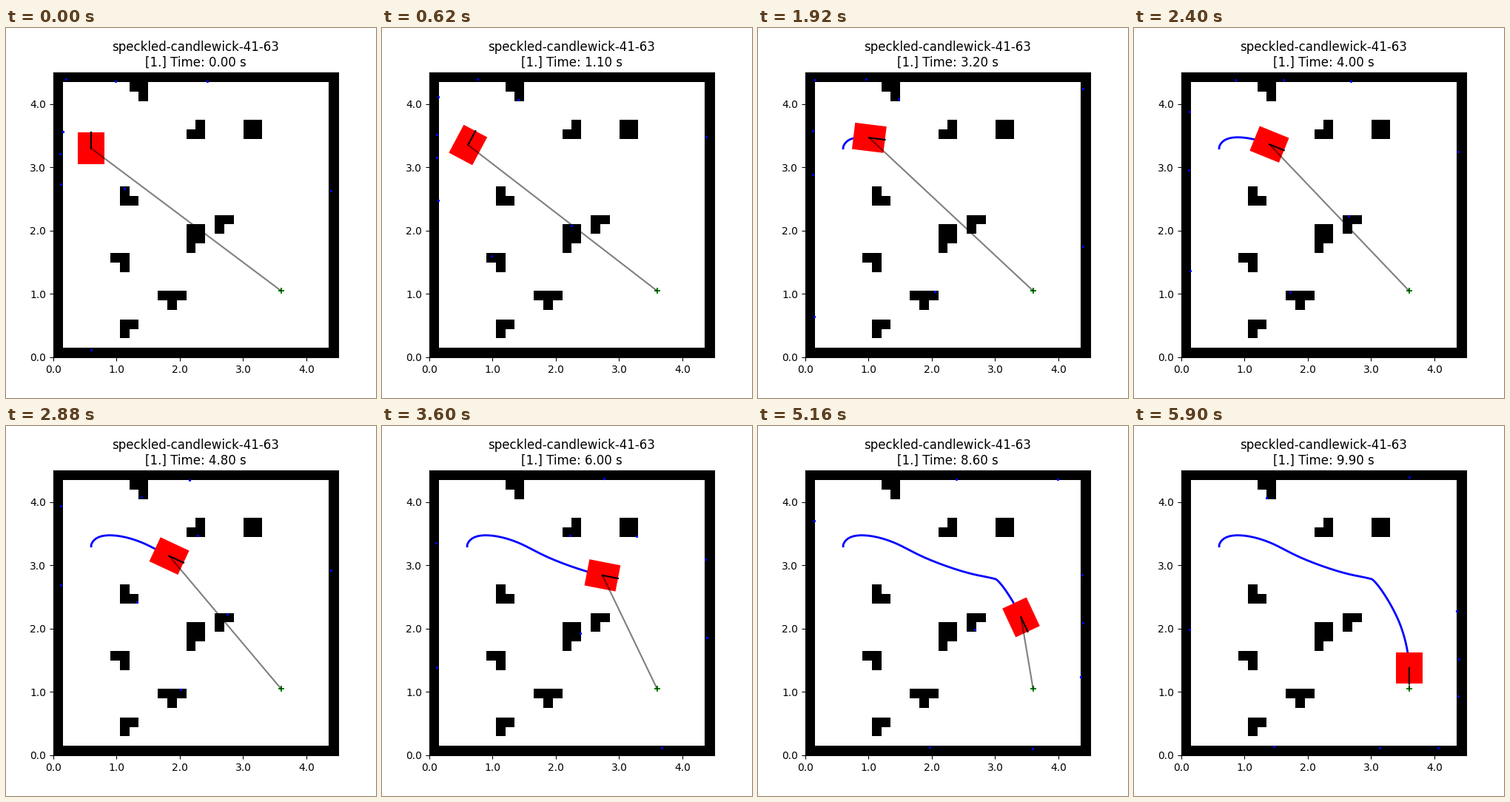
Recreate the animation shown at these times as a matplotlib script. Size 500 by 500 pixels, loop 5.92 s.

```python
import numpy as np
import matplotlib.pyplot as plt
from matplotlib.animation import FuncAnimation
from matplotlib.patches import Polygon

NAME = "speckled-candlewick-41-63"
CELL, N = 0.15, 30
SIZE = CELL * N
GOAL = np.array([3.6, 1.05])
STEPS = 100
LENGTH, WIDTH = 0.5, 0.42

# Obstacles: (left column, top row) -> rows from top to bottom
BLOCKS = {
    (8, 28): "## .#", (14, 24): ".# ##", (20, 24): "## ##",
    (7, 17): "#. ##", (14, 13): "## ## #.", (17, 14): "## #.",
    (6, 10): "## .#", (11, 6): "### .#.", (7, 3): "## #.",
}

# Key poses: step, x, y, heading in degrees, speed in metres per step
KEYS = np.array([
    (0, 0.6, 3.3, 90, 0.003),
    (11, 0.614, 3.354, 62, 0.01),
    (32, 1.012, 3.467, -7, 0.04),
    (42, 1.5, 3.316, -26, 0.06),
    (48, 1.833, 3.148, -25, 0.066),
    (60, 2.737, 2.842, -11, 0.066),
    (69, 3.012, 2.781, -25, 0.005),
    (74, 3.07, 2.729, -48, 0.025),
    (86, 3.41, 2.18, -65, 0.075),
    (99, 3.6, 1.38, -90, 0.04),
])


def unit(a):
    return np.stack([np.cos(a), np.sin(a)], axis=-1)


def make_grid():
    grid = np.zeros((N, N), bool)
    grid[[0, -1], :] = grid[:, [0, -1]] = True
    for (col, row), shape in BLOCKS.items():
        for j, line in enumerate(shape.split()):
            for i, ch in enumerate(line):
                grid[row - j, col + i] |= ch == "#"
    return grid


def make_poses():
    """Cubic Hermite drive through the key poses, facing along its velocity."""
    steps, xy = KEYS[:, 0], KEYS[:, 1:3]
    vel = KEYS[:, 4:] * unit(np.radians(KEYS[:, 3]))
    t = np.arange(STEPS)
    k = np.searchsorted(steps, t, side="right").clip(1, len(steps) - 1)
    span = (steps[k] - steps[k - 1])[:, None]
    u = (t - steps[k - 1])[:, None] / span
    p, d = xy[k - 1], xy[k] - xy[k - 1]
    a, b = vel[k - 1] * span, vel[k] * span
    pos = p + a * u + (3 * d - 2 * a - b) * u**2 + (a + b - 2 * d) * u**3
    v = a + 2 * (3 * d - 2 * a - b) * u + 3 * (a + b - 2 * d) * u**2
    return pos, np.arctan2(v[:, 1], v[:, 0])


def scan(pos, theta, rng):
    """End points of nine beams, each sunk a little into what it hits."""
    rays = unit(theta + np.pi + np.radians(40) * np.arange(9))
    reach = np.arange(0, 6.5, 0.005)
    cells = ((pos + reach[:, None, None] * rays) / CELL).astype(int)
    cells = cells.clip(0, N - 1)
    hit = reach[grid[cells[..., 1], cells[..., 0]].argmax(axis=0)]
    return pos + (hit + rng.uniform(0, 0.045, 9))[:, None] * rays


grid = make_grid()
path, heading = make_poses()
rng = np.random.default_rng(7)
scans = [scan(p, a, rng) for p, a in zip(path, heading)]
CORNERS = np.array([(-1, -1), (1, -1), (1, 1), (-1, 1)]) / 2

fig, ax = plt.subplots(figsize=(5, 5), dpi=100)
ax.imshow(grid, cmap="binary", origin="lower", extent=(0, SIZE, 0, SIZE),
          interpolation="nearest")
ticks = np.arange(5)
ax.set_xticks(ticks, [f"{t:.1f}" for t in ticks])
ax.set_yticks(ticks, [f"{t:.1f}" for t in ticks])
title = ax.set_title("")

trail, = ax.plot([], [], color="b", lw=2, zorder=2)
body = ax.add_patch(Polygon(CORNERS, fc="r", ec="none", zorder=3))
ax.plot(*GOAL, "+", color="g", ms=6, mew=1.5, zorder=4)
sight, = ax.plot([], [], color="k", alpha=0.5, lw=1.5, zorder=5)
nose, = ax.plot([], [], color="k", lw=1.5, zorder=5)
dots, = ax.plot([], [], "o", color="b", ms=2.4, mew=0, zorder=6)
ax.set(xlim=(0, SIZE), ylim=(0, SIZE))


def draw(tick):
    # Steps last 20 ms and 100 ms in turn
    i = 2 * (tick // 6) + (tick % 6 > 0)
    pos = path[i]
    ahead, side = unit(heading[i]), unit(heading[i] + np.pi / 2)
    title.set_text(f"{NAME}\n[1.] Time: {i / 10:.2f} s")
    trail.set_data(*path[:i + 1].T)
    body.set_xy(pos + CORNERS @ np.array([LENGTH * ahead, WIDTH * side]))
    sight.set_data(*np.array([pos, GOAL]).T)
    nose.set_data(*np.array([pos, pos + LENGTH / 2 * ahead]).T)
    dots.set_data(*scans[i].T)
    return title, trail, body, sight, nose, dots


anim = FuncAnimation(fig, draw, frames=296, interval=20, repeat=True,
                     repeat_delay=0, blit=False)
plt.show()
```
